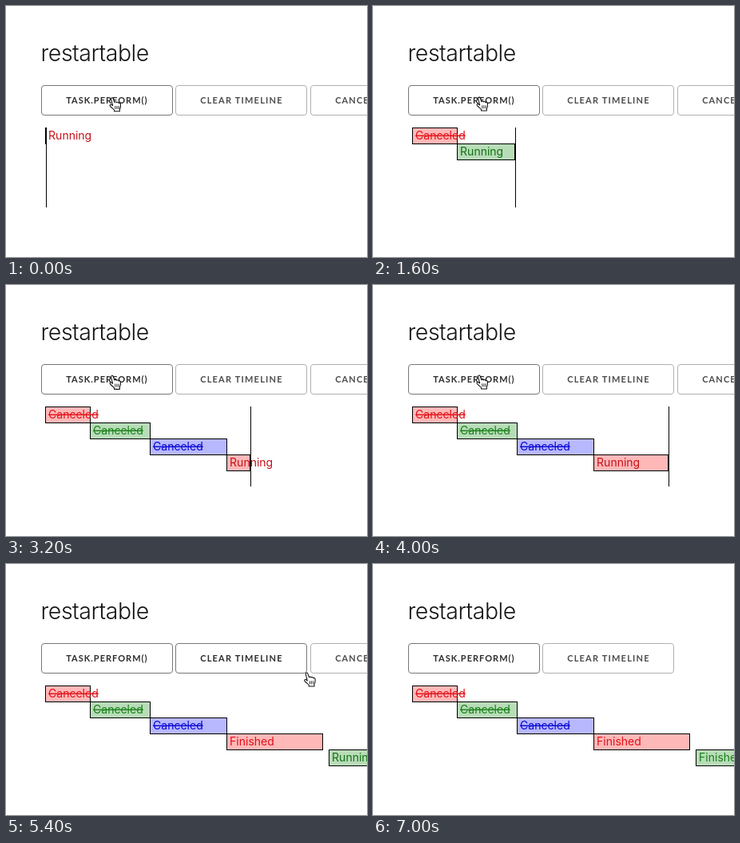
Recreate the animation shown at these times as an HTML page. Size 452 px wide and 314 px high, loop 7.3 s.

```html
<!DOCTYPE html>
<html lang="en">
<head>
<meta charset="utf-8">
<title>restartable</title>
<style>
  html, body { margin: 0; width: 100%; height: 100%; overflow: hidden; background: #fff; }
  svg { display: block; width: 452px; height: 314px; font-family: Inter, "Open Sans", sans-serif; }
  .title { font-size: 28.5px; font-weight: 300; letter-spacing: -.5px; fill: #151515; }
  .button rect { fill: #fff; stroke: #b0b0b0; }
  .button text { font: 700 11px Lato, sans-serif; fill: #4c4c4c; }
  .button.active rect { stroke: #777; }
  .button.active text { fill: #2c2c2c; }
  .task rect { stroke: #000; }
  .task text { font-size: 14px; }
</style>
</head>
<body>
<svg id="stage" viewBox="0 0 452 314">
  <text class="title" x="43.6" y="69">restartable</text>
</svg>
<script>
const LOOP = 7300, TICK = 100, SPEED = 0.08, ORIGIN = 49.5;
const stage = document.getElementById('stage');

const RED = { fill: '#ffb8b8', running: '#c41018', done: '#e01018' };
const GREEN = { fill: '#b8dcb8', running: '#127012', done: '#188018' };
const BLUE = { fill: '#b8b8ff', running: '#0808b4', done: '#0808d4' };

const tasks = [
  { start: 0, end: 700, color: RED, result: 'Canceled' },
  { start: 700, end: 1640, color: GREEN, result: 'Canceled' },
  { start: 1640, end: 2840, color: BLUE, result: 'Canceled' },
  { start: 2840, end: 4340, color: RED, result: 'Finished' },
  { start: 4440, end: 5940, color: GREEN, result: 'Finished' }
];

function add(parent, tag, attrs, text) {
  const el = document.createElementNS(stage.namespaceURI, tag);
  set(el, attrs);
  if (text) el.textContent = text;
  parent.appendChild(el);
  return el;
}

function set(el, attrs) {
  for (const key in attrs) el.setAttribute(key, attrs[key]);
}

function show(el, visible) {
  el.setAttribute('visibility', visible ? 'visible' : 'hidden');
}

function addButton(x, label, spacing) {
  const g = add(stage, 'g', { class: 'button' });
  add(g, 'rect', { x, y: 99.5, width: 164, height: 37, rx: 3.5 });
  add(g, 'text', { x: x + 30.7, y: 122, 'letter-spacing': spacing }, label);
  return g;
}

// Whole-pixel steps keep the one-pixel strokes sharp.
const toX = time => ORIGIN + Math.round(time * SPEED);

const performButton = addButton(44.5, 'TASK.PERFORM()', 1);
const clearButton = addButton(212.5, 'CLEAR TIMELINE', 1.2);
const cancelButton = addButton(381.5, 'CANCEL ALL', 1.1);
performButton.classList.add('active');

tasks.forEach((task, i) => {
  const x = toX(task.start), y = 152.5 + i * 20;
  task.group = add(stage, 'g', { class: 'task' });
  task.bar = add(task.group, 'rect', { x, y, height: 20, fill: task.color.fill });
  task.label = add(task.group, 'text', { x: x + 3.6, y: y + 14.5 });
});

const playhead = add(stage, 'rect', { y: 152, width: 1, height: 100, fill: '#000' });

const cursor = add(stage, 'g', {
  fill: '#fff', stroke: '#111', 'stroke-linejoin': 'round', 'stroke-linecap': 'round'
});
add(cursor, 'path', {
  d: 'M1.8 1.9C1.6 .2 3.7 -.2 4.3 1.3L5.9 5.7C6.4 4.7 7.8 4.8 8.2 5.9' +
     'C8.9 5.1 10.3 5.4 10.6 6.6C11.6 6.1 12.9 6.8 13 8.2' +
     'C13.2 10.6 12.9 12.2 11.9 13.8V16.2H5.6V14.8C4.4 13.4 2.6 12.1 .8 10.2' +
     'C-.2 9 .9 7.8 2.3 8.5L3.8 9.6Z'
});
add(cursor, 'path', { d: 'M6.7 10.3V13.3M8.7 10.3V13.3M10.7 10.3V13.3', 'stroke-width': .8 });

function drawTask(task, t) {
  const running = t < task.end;
  show(task.group, t >= task.start);
  set(task.bar, { width: Math.max(1, toX(Math.min(t, task.end)) - toX(task.start)) });
  set(task.label, {
    fill: running ? task.color.running : task.color.done,
    'text-decoration': !running && task.result === 'Canceled' ? 'line-through' : 'none'
  });
  task.label.textContent = running ? 'Running' : task.result;
}

function drawCursor(t) {
  // A slight upward drift, then a sweep off the right side.
  const drift = Math.min(t, 4600) / 4600;
  const sweep = Math.min(1, Math.max(0, (t - 4600) / 1100));
  const x = 129.6 + 335 * sweep;
  const y = 114.4 - 2 * drift + 32 * sweep;
  set(cursor, { transform: `translate(${x} ${y}) scale(1.07)` });
  clearButton.classList.toggle('active', x + 2 >= 212 && x + 2 <= 377);
}

function render(time) {
  const t = Math.floor(time % LOOP / TICK) * TICK;
  tasks.forEach(task => drawTask(task, t));
  set(playhead, { x: toX(t) + 0.5 });
  show(cancelButton, t < tasks[tasks.length - 1].end);
  drawCursor(t);
}

const begin = performance.now();
function loop() {
  render(performance.now() - begin);
  requestAnimationFrame(loop);
}
loop();
</script>
</body>
</html>
```
